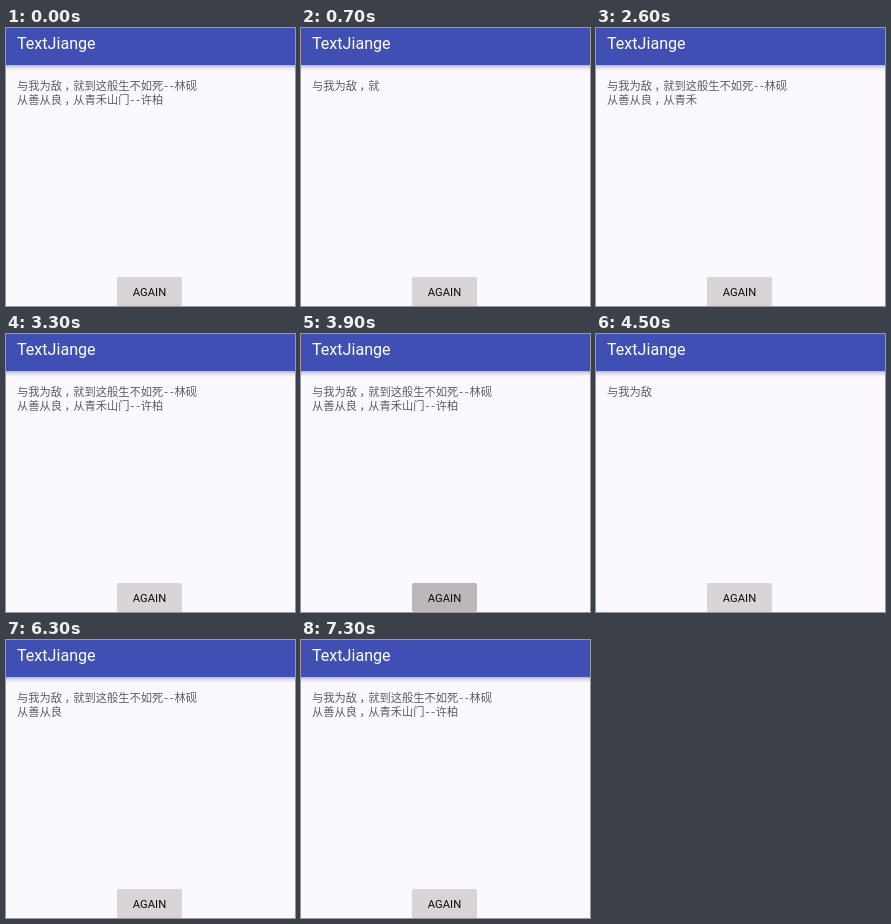
Write an HTML page that moves like this. It is 289 px wide and 278 px high and loops after 8 s.

```html
<!DOCTYPE html>
<html lang="zh-CN">
<head>
<meta charset="utf-8">
<style>
html, body { margin: 0; width: 100%; height: 100%; overflow: hidden; background: #fbf9fd; }
svg { display: block; }
text { font-family: Roboto, sans-serif; font-weight: 400; }
.line {
  font: 400 11.25px "Noto Sans Mono CJK SC", "Noto Sans CJK SC", "Noto Sans CJK", sans-serif;
  fill: #5f5c60;
}
</style>
</head>
<body>
<svg width="289" height="278" viewBox="0 0 289 278">
  <defs>
    <linearGradient id="shade" x2="0" y2="1">
      <stop stop-color="#b4b4c6"/>
      <stop offset=".4" stop-color="#dedde8"/>
      <stop offset="1" stop-color="#fbf9fd"/>
    </linearGradient>
  </defs>
  <rect width="289" height="278" fill="#fbf9fd"/>
  <rect y="37" width="289" height="6" fill="url(#shade)"/>
  <rect width="289" height="37" fill="#3f4fb4"/>
  <text x="11" y="21" font-size="16.1" fill="#fff">TextJiange</text>
  <text class="line" y="62"></text>
  <text class="line" y="76"></text>
  <rect x="111" y="249.6" width="65" height="28.4" rx="2" fill="#cbc7cb"/>
  <rect id="button" x="111" y="249" width="65" height="28.6" rx="2"/>
  <text x="143.5" y="268" font-size="11.25" text-anchor="middle" fill="#0c0a0c">AGAIN</text>
</svg>
<script>
const STEP = 100, LOOP = 8000, CELL = 11.25;
const message = '与我为敌，就到这般生不如死--林砚\n从善从良，从青禾山门--许柏';
const lines = document.querySelectorAll('.line');
const button = document.getElementById('button');

// Full-width cells, half cells for hyphens, commas nearer the middle of their cell
function layout(text) {
  let x = 11;
  return [...text].map(c => {
    const at = c === '，' ? x + 2.5 : x;
    x += c === '-' ? CELL / 2 : CELL;
    return at;
  }).join(' ');
}
message.split('\n').forEach((text, i) => lines[i].setAttribute('x', layout(text)));

// Characters shown; the first run stutters, the second is even
function typed(t) {
  let s = Math.floor(t / STEP);
  if ([6, 15, 27, 31].includes(s)) s--;
  if (s < 3) return message.length;
  if (s < 20) return s - 1;
  if (s < 32) return s;
  if (s < 42) return s - 1;
  return s - 41;
}

function buttonColor(t) {
  const press = t < 3900 ? 0 : Math.max(0, Math.min(1, (4400 - t) / 200));
  const mix = (a, b) => a + (b - a) * press;
  return `rgb(${mix(216, 189)},${mix(212, 183)},${mix(216, 187)})`;
}

function draw() {
  const t = performance.now() % LOOP;
  const shown = message.slice(0, typed(t)).split('\n');
  lines.forEach((line, i) => {
    const text = shown[i] || '';
    if (line.textContent !== text) line.textContent = text;
  });
  button.setAttribute('fill', buttonColor(t));
  requestAnimationFrame(draw);
}
draw();
</script>
</body>
</html>
```
